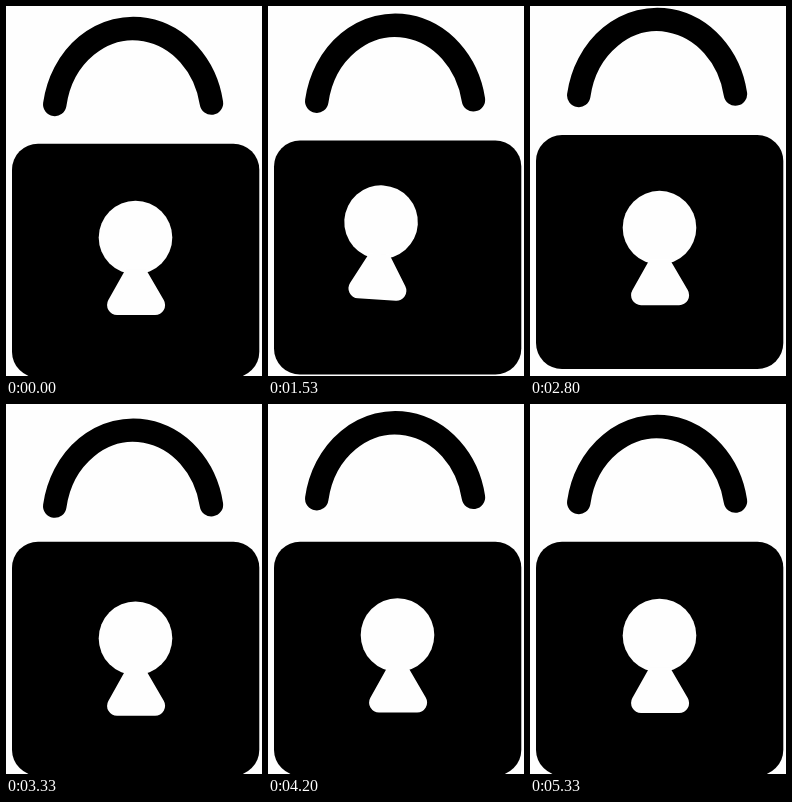
Animation, 256 px wide and 370 px high, one loop 5730 ms. Source, as an HTML page with a canvas:

```html
<!DOCTYPE html>
<html lang="en">
<head>
<meta charset="utf-8">
<title>Bouncing padlock</title>
<style>
  html, body { margin: 0; width: 100%; height: 100%; overflow: hidden; background: #fefefe; }
  canvas { display: block; }
</style>
</head>
<body>
<canvas id="stage" width="256" height="370"></canvas>
<script>
const ctx = document.getElementById('stage').getContext('2d');
const LOOP = 5730;
const HOP = 563;          // length of one hop in ms
const LAG = 124;          // the shackle follows the body
const LOOK = 237;         // small hops while the keyhole looks around
const FIRST = 1888;       // two pairs of full hops
const SECOND = 3630;
const SETTLE = 450;
const PAPER = '#fefefe';
const INK = '#000';

const within = (t, start, span) => Math.min(1, Math.max(0, (t - start) / span));

// A row of smooth bumps from 0 to 1 and back.
const bumps = (t, start, count = 1, span = HOP) =>
  Math.sin(Math.PI * count * within(t, start, count * span)) ** 2;

const fullHops = t => -10 * (bumps(t, FIRST, 2) + bumps(t, SECOND, 2));

const settle = (t, start) => bumps(t, start + 2 * HOP, 1, SETTLE);

const bodyY = t => fullHops(t) - 5.4 * bumps(t, LOOK, 3);

function shackleY(t) {
  const late = t - LAG;
  return fullHops(late) - 8 * bumps(t, LOOK + HOP / 2, 2)
    + 4 * (settle(late, FIRST) + settle(late, SECOND));
}

function keyholePose(t) {
  const late = t - 45;
  const look = within(t, 250, 2020);
  const x = 22.7 * Math.sin(2 * Math.PI * look);
  const lift = 16 * Math.sin(Math.PI * look) ** 2;
  return { x, y: bodyY(late) - lift + 3 * settle(late, FIRST), degrees: -0.22 * x };
}

// 25 poses a second, shown on a 30 Hz clock.
function poseTime(t) {
  const block = Math.floor(t / 200) * 200;
  const tick = Math.min(5, Math.floor((t - block + 4) * 3 / 100));
  return block + 40 * Math.max(0, tick - 1);
}

function drawShackle(y) {
  ctx.beginPath();
  ctx.ellipse(127.2, 112.5 + y, 79.4, 90, 0, 1.05 * Math.PI, 1.945 * Math.PI);
  ctx.lineWidth = 23.5;
  ctx.lineCap = 'round';
  ctx.strokeStyle = INK;
  ctx.stroke();
}

function drawBody(y) {
  ctx.beginPath();
  ctx.roundRect(6, 137.7 + y, 247.3, 234, 26);
  ctx.fillStyle = INK;
  ctx.fill();
}

function drawKeyhole({ x, y, degrees }) {
  ctx.save();
  ctx.translate(129.5 + x, 231.5 + y);
  ctx.rotate(degrees * Math.PI / 180);
  ctx.fillStyle = PAPER;
  ctx.beginPath();
  ctx.arc(0, 0, 36.8, 0, 2 * Math.PI);
  ctx.fill();
  ctx.beginPath();
  ctx.moveTo(-10, 32);
  ctx.arcTo(-35.5, 77.5, 0, 77.5, 10);
  ctx.arcTo(37, 77.5, 10.5, 32, 10);
  ctx.lineTo(10.5, 32);
  ctx.closePath();
  ctx.fill();
  ctx.restore();
}

function draw(now) {
  const t = poseTime(now % LOOP);
  ctx.fillStyle = PAPER;
  ctx.fillRect(0, 0, 256, 370);
  drawShackle(shackleY(t));
  drawBody(bodyY(t));
  drawKeyhole(keyholePose(t));
}

const start = performance.now();
function loop() {
  draw(performance.now() - start);
  requestAnimationFrame(loop);
}
loop();
</script>
</body>
</html>
```
